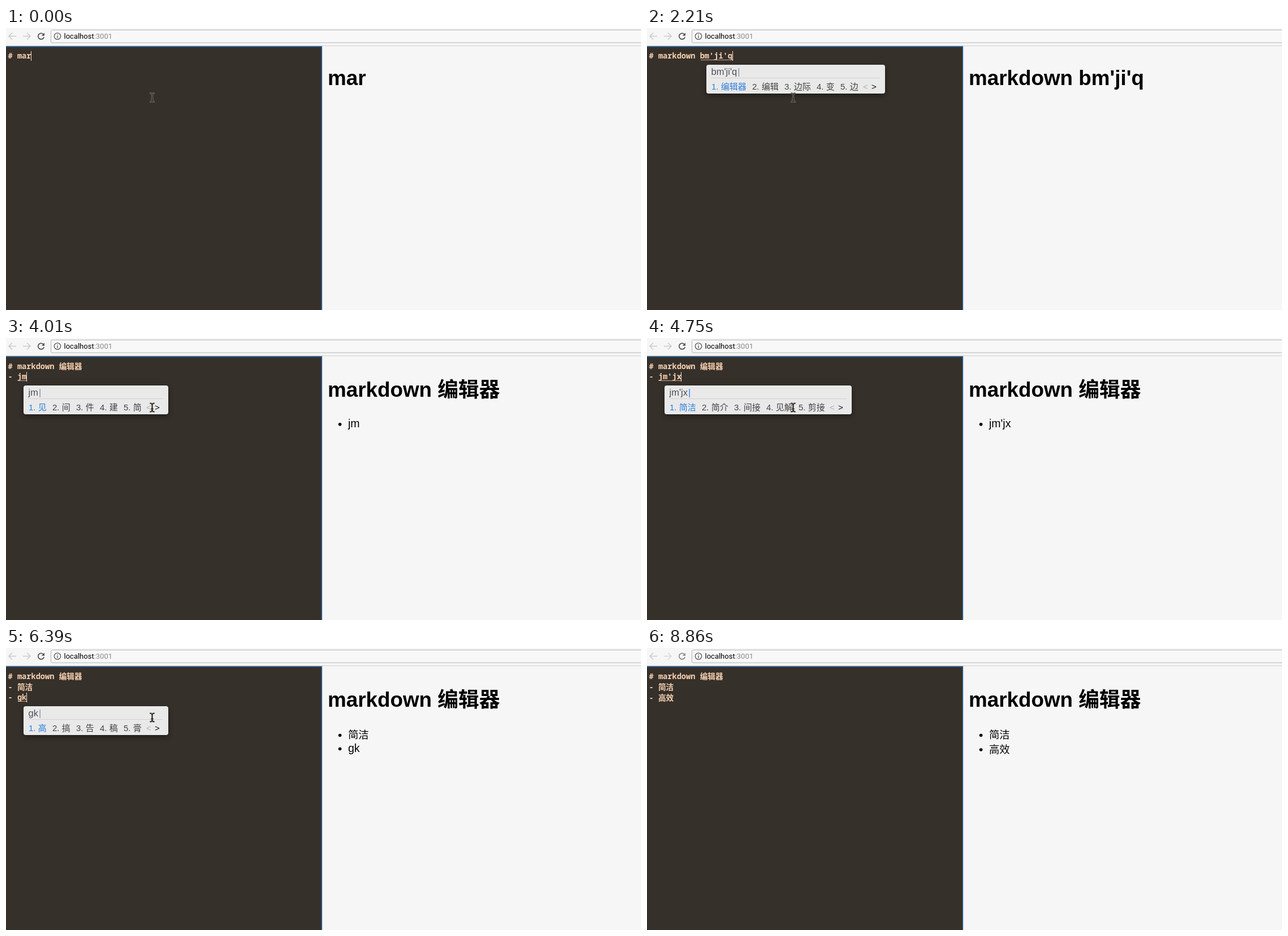
Write an HTML page that moves like this. It is 1123 by 499 pixels and loops after 8.96 s.

```html
<!DOCTYPE html>
<html lang="zh-CN">
<head>
<meta charset="utf-8">
<title>Markdown editor</title>
<style>
  html, body { margin: 0; width: 100%; height: 100%; overflow: hidden; background: #f6f6f6; }
  svg { display: block; }
  text { white-space: pre; font-family: "Liberation Sans", "Noto Sans CJK SC", "Noto Sans CJK", sans-serif; }
  .url { font: 13px Roboto, sans-serif; }
  .code { font: 600 13.67px "Noto Sans Mono", "Noto Sans CJK SC", "Noto Sans CJK", monospace; fill: #f8d2b0; }
  .title { font-size: 36.8px; font-weight: 700; }
  .typed { font-size: 16.5px; fill: #4c4f58; }
  .choice { font-size: 15px; fill: #444; }
  #popup rect { filter: drop-shadow(0 3px 5px rgba(0, 0, 0, .45)); }
</style>
</head>
<body>
<svg width="1123" height="499" viewBox="0 0 1123 499">
  <rect width="1123" height="499" fill="#f6f6f6"/>
  <path d="M0 31.5H1123" stroke="#d0d0d0"/>
  <g fill="none" stroke-width="1.6">
    <path d="M18 14.5H5.5M11 8.5L5 14.5L11 20.5" stroke="#cbcbcb"/>
    <g id="nav">
      <path d="M30 14.5H42.5M37 8.5L43 14.5L37 20.5" stroke="#cbcbcb"/>
      <path d="M66 11A5.3 5.3 0 1 0 67.2 16" stroke="#555" stroke-width="1.8"/>
      <path d="M68 8.5V13.8H62.7Z" fill="#555"/>
    </g>
  </g>
  <rect x="79.5" y="3.5" width="1060" height="22.5" rx="2" fill="#f8f8f8" stroke="#b4b4b4"/>
  <circle cx="91" cy="14.5" r="5.7" fill="none" stroke="#555" stroke-width="1.3"/>
  <path d="M91 13.7V17.8M91 11.2V12.6" stroke="#555" stroke-width="1.4"/>
  <text class="url" x="102.5" y="19">localhost<tspan fill="#888">:3001</tspan></text>

  <rect y="32" width="559" height="467" fill="#36302b"/>
  <path d="M0 32.7H558.5V499" fill="none" stroke="#2d70ae" stroke-width="1.4"/>
  <g id="code"></g>
  <path id="underline" stroke="#c9a68c"/>
  <path id="caret" stroke="#f3dfcc"/>
  <text id="badge" x="99.5" y="78.5" font-size="11.5" fill="#fff">中</text>

  <g id="preview"></g>
  <g id="popup">
    <rect height="51" rx="4" fill="#e9e9e9"/>
    <path id="rule" stroke="#d2d2d2"/>
    <text class="typed" x="8.5" y="17.5"><tspan id="typed"></tspan><tspan id="bar" dx="1">|</tspan></text>
    <g id="choices"></g>
  </g>

  <g id="beam" fill="none">
    <path id="beamShape" d="M254.5 115.5Q258.5 115.5 258.5 118.5V127.5Q258.5 130.5 254.5 130.5M262.5 115.5Q258.5 115.5 258.5 118.5V127.5Q258.5 130.5 262.5 130.5M256.5 125.5H260.5" stroke="#8a8681" stroke-width="2.5"/>
    <use href="#beamShape" style="stroke:#191715;stroke-width:1.2"/>
    <path d="M254.5 115.5Q258.5 115.5 258.5 118.5V127.5Q258.5 130.5 254.5 130.5M262.5 115.5Q258.5 115.5 258.5 118.5V127.5Q258.5 130.5 262.5 130.5M256.5 125.5H260.5" stroke="#191715" stroke-width="1.2"/>
  </g>
  <path id="arrow" d="M258 121V134L261 131.2L263.2 136L265.2 135.1L263.1 130.5H267.2Z" fill="#000" stroke="#fff" stroke-width=".9"/>
</svg>
<script>
const LOOP = 8960;
const CELL = 8.2, WIDE = 13.67;
const head = '# markdown 编辑器';
const first = head + '\n- 简洁';

// [start, committed text, text being composed, candidates]
const steps = [
  [0, '# mar'], [140, '# mark'], [290, '# markd'], [440, '# markdow'], [580, '# markdown'],
  [1030, '# markdown '],
  [1770, '# markdown ', 'b', '不 把 被 吧 比'],
  [1920, '# markdown ', 'bm', '变 边 便 编 遍'],
  [2070, '# markdown ', "bm'ji", '编辑 边际 变 边 便'],
  [2210, '# markdown ', "bm'ji'q", '编辑器 编辑 边际 变 边'],
  [2360, '# markdown ', "bm'ji'qi", '编辑器 编辑 边际 变 边'],
  [2510, head], [2810, head + '\n'], [3260, head + '\n-'], [3410, head + '\n- '],
  [3860, head + '\n- ', 'j', '就 级 将 及 见'],
  [4010, head + '\n- ', 'jm', '见 间 件 建 简'],
  [4150, head + '\n- ', "jm'j", '间接 简介 见解 简洁 剪接'],
  [4450, head + '\n- ', "jm'jx", '简洁 简介 间接 见解 剪接'],
  [4900, first], [5190, first + '\n'], [5490, first + '\n-'], [5790, first + '\n- '],
  [6240, first + '\n- ', 'g', '个 给 过 跟 该'],
  [6390, first + '\n- ', 'gk', '高 搞 告 稿 膏'],
  [6540, first + '\n- ', "gk'x", '高兴 搞笑 高效 高校 高小'],
  [6690, first + '\n- ', "gk'xc", '搞笑 高效 高校 高小 高晓'],
  [7290, first + '\n- 高效']
];
const caretOff = [[1630, 1770], [7140, 7290], [7740, 8180], [8860, LOOP]];

const $ = id => document.getElementById(id);
const within = (t, a, b) => t >= a && t < b;
const hasWide = s => /[\u4e00-\u9fff]/.test(s);
const textWidth = s => [...s].reduce((w, c) => w + (hasWide(c) ? WIDE : CELL), 0);
const label = (s, x, y, cls, extra = '') => `<text class="${cls}" x="${x}" y="${y}" ${extra}>${s}</text>`;
const show = (id, on) => { $(id).style.display = on ? '' : 'none'; };

function drawPreview(lines) {
  let out = label(lines[0].slice(2).trimEnd(), 569, hasWide(lines[0]) ? 104 : 101, 'title');
  lines.slice(1).forEach((line, i) => {
    if (!line) return;
    const item = line.slice(2), wide = hasWide(item);
    const y = 158 + i * 26 + (wide ? 2 : 0);
    const dotY = i ? (wide ? 180 : 178.5) : (wide ? 154.5 : 152.8);
    out += `<circle cx="590.6" cy="${dotY}" r="2.8"/>`;
    out += label(item, 605, y, 'item', `font-size="${wide ? 18.3 : 19.5}"`);
  });
  $('preview').innerHTML = out;
}

function drawPopup(composed, candidates, x, row) {
  let left = 9, out = '';
  candidates.split(' ').forEach((word, i) => {
    out += label(`${i + 1}. ${word}`, left, 43.5, 'choice', i ? '' : 'style="fill:#2b7fdd"');
    left += 27 + 15 * word.length;
  });
  out += label('&lt;', left - 2, 43.5, 'choice', 'style="fill:#b2b2b2"');
  out += label('&gt;', left + 13, 43.5, 'choice', 'style="fill:#111"');
  $('choices').innerHTML = out;
  $('typed').textContent = composed;
  $('popup').setAttribute('transform', `translate(${x} ${65 + row * 19})`);
  $('popup').firstElementChild.setAttribute('width', left + 37);
  $('rule').setAttribute('d', `M8 23.5H${left + 28}`);
}

function drawStep([, committed, composed = '', candidates]) {
  const lines = (committed + composed).split('\n');
  const row = lines.length - 1, last = lines[row];
  const baseline = i => 54 + i * 19 + (hasWide(lines[i]) ? 1 : 0);
  $('code').innerHTML = lines.map((s, i) => label(s, 3.5, baseline(i), 'code')).join('');

  const end = Math.round(4 + textWidth(last)) + .5;
  const y = baseline(row);
  $('caret').setAttribute('d', `M${end - 1} ${y - 13}v17`);
  const start = Math.round(end - textWidth(composed));
  $('underline').setAttribute('d', composed ? `M${start} ${y + 2.5}H${end}` : '');

  show('popup', composed);
  if (composed) drawPopup(composed, candidates, start + 10, row);
  drawPreview(lines);
}

let current;
function frame() {
  const t = performance.now() % LOOP;
  const step = steps.findLast(s => s[0] <= t);
  if (step !== current) drawStep(current = step);

  const overPopup = within(t, 7140, 7290);
  show('caret', !caretOff.some(([a, b]) => within(t, a, b)));
  show('badge', within(t, 1330, 1770));
  show('arrow', overPopup);
  show('beam', !overPopup && t < 7880);
  $('bar').style.fill = within(t, 4750, 4900) ? '#2b7fdd' : '#7f93a8';
  $('nav').style.opacity = t < 8860 ? 1 : .65;
  requestAnimationFrame(frame);
}
frame();
</script>
</body>
</html>
```
